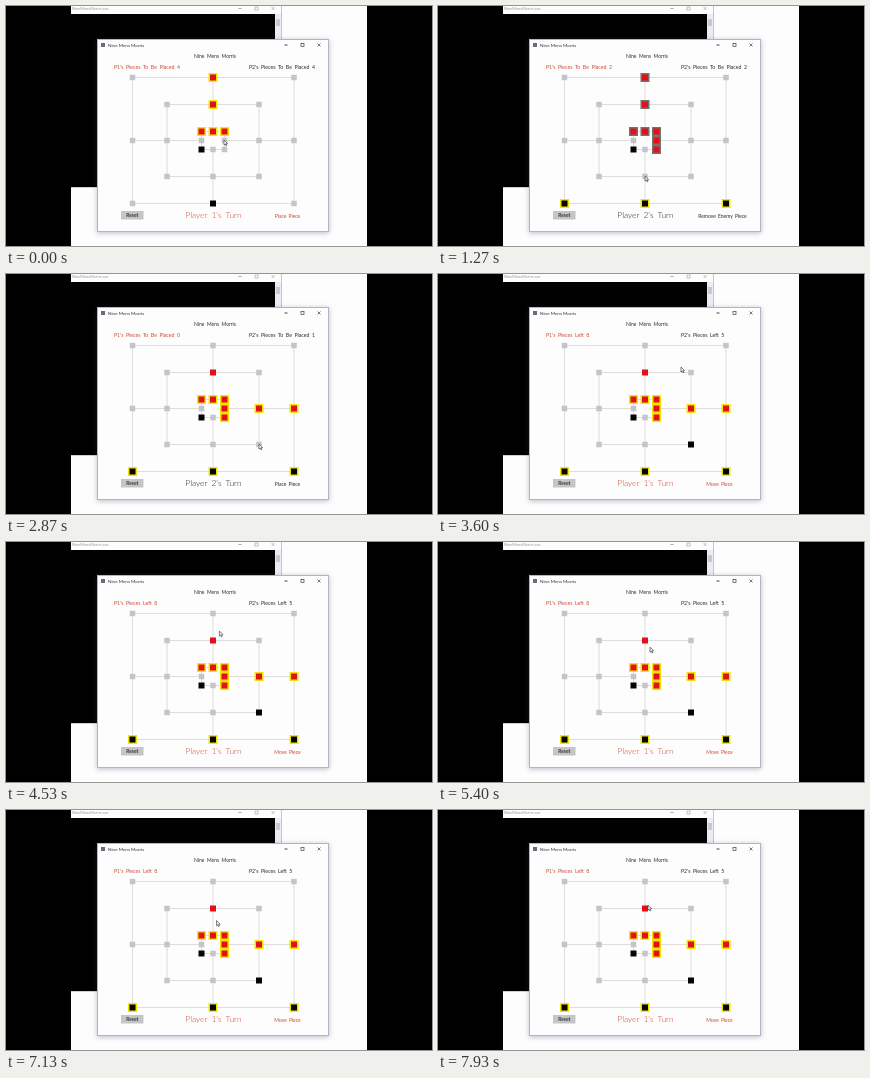
Animation of 426 by 240 pixels, one loop 8 s. Source, as an HTML page with a canvas:

```html
<!DOCTYPE html>
<html lang="en">
<head>
<meta charset="utf-8">
<title>Nine Mens Morris</title>
<style>
  html, body { margin: 0; width: 100%; height: 100%; overflow: hidden; background: #000; }
  canvas { display: block; width: 426px; height: 240px; }
</style>
</head>
<body>
<canvas id="stage" width="426" height="240"></canvas>
<script>
const ctx = document.getElementById('stage').getContext('2d');
const LOOP = 8000, STEP = 1000 / 15;
const RED = '#e3101c', BLACK = '#050505', RUST = '#cf4632', INK = '#292929';
const LINE = '#dfdcda', NODE = '#c5c4cb', YELLOW = '#f2e600';

// Three nested rings, each given by left, middle, right and top, middle, bottom.
const rings = [
  { x: [126.5, 207, 288], y: [71.5, 134.5, 197.5] },
  { x: [161, 207, 253], y: [98.5, 134.5, 170.5] },
  { x: [195.5, 207, 218.5], y: [125.5, 134.5, 143.5] }
];
const key = (ring, col, row) => `${ring}${col}${row}`;
const nodes = [];
rings.forEach((ring, r) => {
  for (let col = 0; col < 3; col++)
    for (let row = 0; row < 3; row++)
      if (col !== 1 || row !== 1)
        nodes.push({ id: key(r, col, row), x: ring.x[col], y: ring.y[row] });
});

const mills = [];
for (let i = 0; i < 3; i++) {
  for (const edge of [0, 2]) {
    mills.push([0, 1, 2].map(n => key(i, n, edge)));
    mills.push([0, 1, 2].map(n => key(i, edge, n)));
  }
}
for (const edge of [0, 2]) {
  mills.push([0, 1, 2].map(r => key(r, 1, edge)));
  mills.push([0, 1, 2].map(r => key(r, edge, 1)));
}

const opening = {
  '010': 1, '110': 1, '200': 1, '210': 1, '220': 1, '202': 2, '012': 2
};
// Time, node, owner after the move (0 removes), next player, next action.
const moves = [
  [200, '221', 1, 2, 'Place Piece'],
  [470, '002', 2, 1, 'Place Piece'],
  [800, '222', 1, 2, 'Place Piece'],
  [1130, '022', 2, 2, 'Remove Enemy Piece'],
  [1470, '010', 0, 1, 'Place Piece'],
  [1670, '121', 1, 2, 'Place Piece'],
  [1930, '122', 2, 1, 'Place Piece'],
  [2260, '021', 1, 1, 'Remove Enemy Piece'],
  [2600, '122', 0, 2, 'Place Piece'],
  [2930, '122', 2, 1, 'Move Piece']
];
const pointer = [
  [0, 218, 134], [200, 218, 134], [470, 126, 197], [800, 218, 143],
  [1130, 288, 197], [1270, 207, 170], [1470, 207, 71], [1670, 253, 134],
  [1930, 253, 170], [2130, 291, 136], [2260, 288, 134], [2600, 253, 170],
  [2930, 253, 170], [3600, 243, 93], [4530, 213, 89], [6330, 211, 123],
  [7930, 210, 95], [8000, 210, 95]
];

function gameAt(time) {
  const game = { board: { ...opening }, left: [0, 4, 4], player: 1, action: 'Place Piece' };
  for (const [at, id, owner, player, action] of moves) {
    if (at > time) break;
    game.board[id] = owner;
    if (owner) game.left[owner]--;
    Object.assign(game, { player, action });
  }
  return game;
}

function pointerAt(time) {
  const i = pointer.findIndex(p => p[0] > time);
  const [t0, x0, y0] = pointer[i - 1], [t1, x1, y1] = pointer[i];
  const u = (time - t0) / (t1 - t0), ease = u * u * (3 - 2 * u);
  return [x0 + (x1 - x0) * ease, y0 + (y1 - y0) * ease];
}

function rect(x, y, w, h, color) {
  ctx.fillStyle = color;
  ctx.fillRect(x, y, w, h);
}
function square(x, y, size, color) {
  rect(x - size / 2, y - size / 2, size, size, color);
}
function line(x1, y1, x2, y2, color = LINE) {
  ctx.strokeStyle = color;
  ctx.lineWidth = 1;
  ctx.beginPath();
  ctx.moveTo(x1, y1);
  ctx.lineTo(x2, y2);
  ctx.stroke();
}
function label(text, x, y, size, color, align = 'center', gap = 0, weight = 400) {
  ctx.font = `${weight} ${size}px Lato, sans-serif`;
  ctx.wordSpacing = `${gap}px`;
  ctx.textAlign = align;
  ctx.textBaseline = 'middle';
  ctx.fillStyle = color;
  ctx.fillText(text, x, y);
}

function windowButtons(x, y, color) {
  line(x - 1.5, y, x + 1.5, y, color);
  ctx.lineWidth = 0.7;
  ctx.strokeRect(x + 15, y - 1.5, 3, 3);
  ctx.beginPath();
  for (const s of [-1, 1]) {
    ctx.moveTo(x + 31.5, y - 1.5 * s);
    ctx.lineTo(x + 34.5, y + 1.5 * s);
  }
  ctx.stroke();
}

function drawDesktop() {
  rect(0, 0, 426, 240, '#000');
  rect(65, 0, 296, 240, '#fdfdfd');
  label('NineMensMorris.exe', 66, 2.5, 4, '#999', 'left');
  windowButtons(234, 2.5, '#aaa');
  rect(65, 8, 204, 173, '#000');
  rect(269, 8, 6, 173, '#eeecf3');
  rect(270, 13, 4, 7, '#cac8d2');
  line(275.5, 0, 275.5, 181, '#c6c1df');
  line(65, 181.5, 276, 181.5, '#d0cde0');

  ctx.save();
  ctx.shadowColor = 'rgba(70, 65, 100, .35)';
  ctx.shadowBlur = 5;
  ctx.shadowOffsetY = 1;
  rect(91, 33, 232, 193, '#fdfdfd');
  ctx.restore();
  ctx.strokeStyle = '#b6b1c6';
  ctx.lineWidth = 1;
  ctx.strokeRect(91.5, 33.5, 231, 192);
  square(97, 39, 4, '#77647f');
  label('Nine Mens Morris', 102, 39.3, 4.6, '#333', 'left');
  windowButtons(280, 39, '#444');
}

function drawBoard(game) {
  for (const { x, y } of rings) {
    ctx.strokeStyle = LINE;
    ctx.lineWidth = 1;
    ctx.strokeRect(x[0], y[0], x[2] - x[0], y[2] - y[0]);
  }
  const [outer, , inner] = rings;
  for (const n of [0, 2]) {
    line(207, outer.y[n], 207, inner.y[n]);
    line(outer.x[n], 134.5, inner.x[n], 134.5);
  }

  const milled = new Set(mills.filter(([a, b, c]) => {
    const owner = game.board[a];
    return owner && owner === game.board[b] && owner === game.board[c];
  }).flat());
  const removing = game.action.startsWith('Remove');

  for (const { id, x, y } of nodes) {
    const owner = game.board[id];
    if (!owner) {
      square(x, y, 5.5, NODE);
      continue;
    }
    if (removing && owner !== game.player) square(x, y, 9, '#75716d');
    else if (milled.has(id)) square(x, y, 9, YELLOW);
    square(x, y, 6, owner === 1 ? RED : BLACK);
  }
}

function drawText(game) {
  const color = game.player === 1 ? RUST : INK;
  const moving = game.action === 'Move Piece';
  const counts = moving ? [0, 8, 5] : game.left;
  const status = moving ? 'Left' : 'To Be Placed';
  label('Nine Mens Morris', 209, 50.5, 5, INK, 'center', 1.2);
  label(`P1's Pieces ${status} ${counts[1]}`, 108, 61, 5.2, RUST, 'left', 1.2);
  label(`P2's Pieces ${status} ${counts[2]}`, 243, 61, 5.2, INK, 'left', 1.2);
  label(`Player ${game.player}'s Turn`, 207.5, 209.5, 8.4, color, 'center', 1.8, 300);
  label(game.action, moving || game.action === 'Place Piece' ? 281.5 : 284.5, 210.3, 5, color, 'center', 0.8);
  rect(115, 205, 22.5, 8.5, '#c5c4c7');
  label('Reset', 126.3, 209.4, 5, '#111');
}

function drawPointer(x, y) {
  ctx.beginPath();
  ctx.moveTo(x, y);
  ctx.lineTo(x, y + 5);
  ctx.lineTo(x + 1.2, y + 4);
  ctx.lineTo(x + 2, y + 5.8);
  ctx.lineTo(x + 2.8, y + 5.4);
  ctx.lineTo(x + 2.1, y + 3.7);
  ctx.lineTo(x + 3.6, y + 3.6);
  ctx.closePath();
  ctx.fillStyle = '#fff';
  ctx.fill();
  ctx.strokeStyle = '#444';
  ctx.lineWidth = 0.7;
  ctx.stroke();
}

function draw(now) {
  const time = Math.floor((now % LOOP) / STEP + 0.01) * STEP;
  const game = gameAt(time);
  drawDesktop();
  drawBoard(game);
  drawText(game);
  drawPointer(...pointerAt(Math.min(time, LOOP - 1)));
  requestAnimationFrame(draw);
}
requestAnimationFrame(draw);
</script>
</body>
</html>
```
